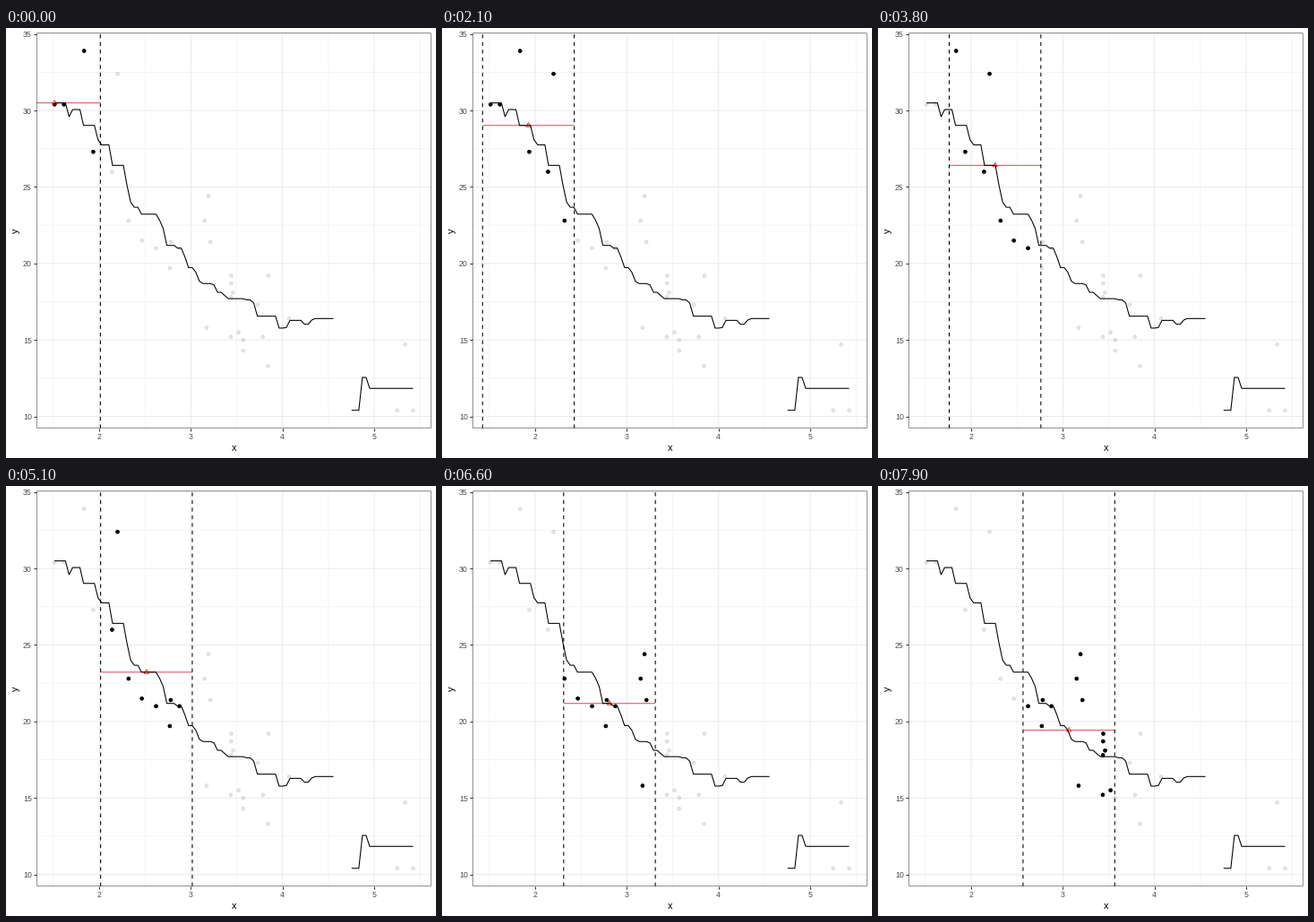
Write a matplotlib script that moves like this. It is 480 px wide and 480 px high and loops after 8 s.

```python
import numpy as np
import matplotlib.pyplot as plt
from matplotlib.animation import FuncAnimation
from matplotlib.patches import Polygon, Rectangle

SIZE, DPI = 480, 72  # at 72 dpi one point is one pixel
FRAMES, INTERVAL = 80, 100
STATES = 200  # window positions across the whole x range
HALF = 0.5
LEFT, RIGHT, TOP, BOTTOM = 34.2, 474.5, 5.5, 446.8
LW = 1.067
THIN = LW / 2
RADIUS, OUTLINE = 1.955, 0.71
RED, PINK, DARK, TEXT, GRID = "red", "#DF536B", "#333333", "#4D4D4D", "#EBEBEB"

plt.rcParams.update({"font.family": "Liberation Sans", "path.snap": False})


def run(x0, step, *heights):
    """Points at even x steps from x0."""
    return [(x0 + k * step, h) for k, h in enumerate(heights)]


points = np.array(
    run(1.513, 0.102, 30.4, 30.4)
    + run(1.835, 0.1, 33.9, 27.3)
    + run(2.14, 0.06, 26, 32.4)
    + run(2.32, 0.145, 22.8, 21.5)
    + run(2.62, 0.15, 21, 19.7)
    + run(2.78, 0.095, 21.4, 21)
    + run(3.15, 0.021, 22.8, 15.8, 24.4, 21.4)
    + run(3.435, 0.0017, 15.2, 17.8, 18.7, 19.2)
    + run(3.46, 0.06, 18.1, 15.5)
    + run(3.57, 0, 15, 14.3)
    + run(3.73, 0.055, 17.3, 15.2, 13.3)
    + run(3.845, 0.225, 19.2, 16.4)
    + run(5.25, 0.087, 10.4, 14.7, 10.4))
x, y = points.T


def in_window(c):
    return np.abs(x - c) <= HALF + 1e-9


def local_mean(c):
    near = in_window(c)
    return y[near].mean() if near.any() else np.nan


def padded(v):
    pad = 0.05 * np.ptp(v)
    return v.min() - pad, v.max() + pad


fig = plt.figure(figsize=(SIZE / DPI, SIZE / DPI), dpi=DPI, facecolor="white")
ax = fig.add_axes([LEFT / SIZE, 1 - BOTTOM / SIZE,
                   (RIGHT - LEFT) / SIZE, (BOTTOM - TOP) / SIZE])
x_ticks, y_ticks = range(2, 6), range(10, 36, 5)
ax.set(xlim=padded(x), ylim=padded(y), xticks=x_ticks, yticks=y_ticks)
ax.spines[:].set_visible(False)
ax.tick_params(length=2.75, width=LW, color=DARK,
               labelbottom=False, labelleft=False)


def px(cx, cy):
    return ax.transData.transform((cx, cy))


def label(cx, cy, s, size=8.8, color=TEXT, **kw):
    """Text starting at a whole pixel, measured from the top left."""
    fig.text(round(cx) / SIZE, 1 - round(cy) / SIZE, s, fontsize=size,
             color=color, ha="left", va="baseline", **kw)


def stroke(color="black", width=LW, **kw):
    return ax.plot([], [], color=color, lw=width, solid_capstyle="butt",
                   dash_capstyle="butt", **kw)[0]


# Grid
for v in np.arange(1.5, 6, 0.5):
    ax.axvline(v, color=GRID, lw=THIN if v % 1 else LW, zorder=0)
for v in np.arange(10, 36, 2.5):
    ax.axhline(v, color=GRID, lw=THIN if v % 5 else LW, zorder=0)

# Axis text
for v in x_ticks:
    label(px(v, 10)[0] - 2.5, BOTTOM + 11.95, str(v))
for v in y_ticks:
    label(LEFT - 14.95, SIZE - px(2, v)[1] + 3.5, str(v))
label((LEFT + RIGHT) / 2 - 2.75, 471.6, "x", 11, "black")
label(13.6, (TOP + BOTTOM) / 2 + 2.75, "y", 11, "black", rotation=90,
      rotation_mode="anchor")

# Dots, window mean, smoothed curve and window edges, bottom to top
dots = ax.scatter(x, y, s=(2 * RADIUS) ** 2, lw=OUTLINE, zorder=2)
mean_line = stroke(PINK, zorder=3)
angles = np.radians([90, 210, 330])
triangle = 1.555 * RADIUS * np.column_stack([np.cos(angles), np.sin(angles)])
marker = ax.add_patch(Polygon(triangle, fill=False, ec=RED, lw=OUTLINE,
                              zorder=3.5, transform=None, joinstyle="round"))
grid = np.linspace(x.min(), x.max(), 100)
stroke(zorder=4).set_data(grid, [local_mean(c) for c in grid])
edges = [stroke(ls=(0, (4, 4)), zorder=5) for _ in range(2)]

# Only the inner half of the border line shows
inset = THIN / 2
fig.add_artist(Rectangle(
    (LEFT + inset, SIZE - BOTTOM + inset), RIGHT - LEFT - THIN,
    BOTTOM - TOP - THIN, fill=False, ec=DARK, lw=THIN, transform=None))


def update(i):
    c = x.min() + np.ptp(x) * i / (STATES - 1)
    m = local_mean(c)
    rgba = np.zeros((len(x), 4))
    rgba[:, 3] = np.where(in_window(c), 1, 0.1)
    dots.set(facecolor=rgba, edgecolor=rgba)
    mean_line.set_data([c - HALF, c + HALF], [m, m])
    for line, e in zip(edges, (c - HALF, c + HALF)):
        line.set_data([e, e], ax.get_ylim())
    marker.set_xy(px(c, m) + triangle)
    return [dots, mean_line, marker, *edges]


anim = FuncAnimation(fig, update, frames=FRAMES, interval=INTERVAL,
                     repeat=True, repeat_delay=0, blit=False)
plt.show()
```
